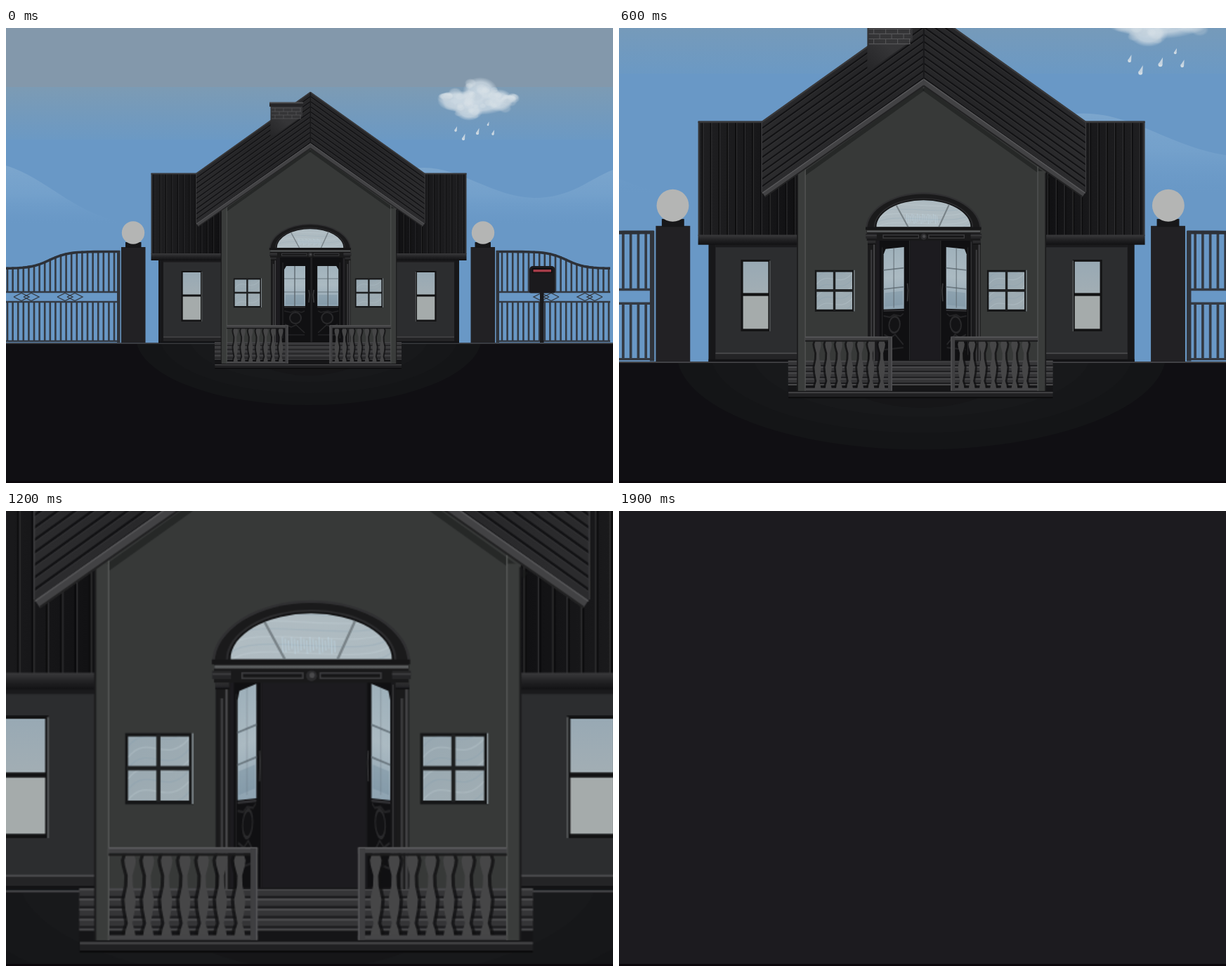
Animation, 864 px wide and 648 px high, one loop 2.1 s. Source, as an HTML page with a canvas:

```html
<!DOCTYPE html>
<html lang="en">
<head>
<meta charset="utf-8">
<title>House</title>
<style>
html, body { margin: 0; width: 100%; height: 100%; overflow: hidden; background: #1c1b1f; }
canvas { display: block; width: 864px; height: 648px; }
</style>
</head>
<body>
<canvas id="stage" width="864" height="648"></canvas>
<script>
const W = 864, H = 648, STEP = 100, LOOP = 2100, LAST = 19;
const FOCUS = { x: 432, y: 384.5 };
const MAX_DENSITY = 1.5;
const INSIDE = '#1c1b1f';
const stage = document.getElementById('stage').getContext('2d');
const scenery = document.createElement('canvas');
scenery.width = W * MAX_DENSITY;
scenery.height = H * MAX_DENSITY;
const ctx = scenery.getContext('2d');

// Apparent distance shrinks evenly, a little slower at the doorstep.
const distance = k => k <= 14 ? 1 - 0.049 * k : 0.314 - 0.0433 * (k - 14);

function box(x1, y1, x2, y2, fill) {
  ctx.fillStyle = fill;
  ctx.fillRect(x1, y1, x2 - x1, y2 - y1);
}
function trace(points) {
  ctx.beginPath();
  points.forEach(([x, y]) => ctx.lineTo(x, y));
}
function poly(points, fill) {
  trace(points);
  ctx.closePath();
  ctx.fillStyle = fill;
  ctx.fill();
}
function line(points, color, width = 1) {
  trace(points);
  ctx.strokeStyle = color;
  ctx.lineWidth = width;
  ctx.stroke();
}
function ellipse(x, y, rx, ry, fill, turn = 0, from = 0, to = 2 * Math.PI) {
  ctx.beginPath();
  ctx.ellipse(x, y, rx, ry, turn, from, to);
  ctx.fillStyle = fill;
  ctx.fill();
}
function ramp(x1, y1, x2, y2, ...colors) {
  const g = ctx.createLinearGradient(x1, y1, x2, y2);
  colors.forEach((c, i) => g.addColorStop(i / (colors.length - 1), c));
  return g;
}
function clipped(path, draw) {
  ctx.save();
  path();
  ctx.clip();
  draw();
  ctx.restore();
}
function mirrored(axis, draw) {
  draw();
  ctx.save();
  ctx.translate(2 * axis, 0);
  ctx.scale(-1, 1);
  draw();
  ctx.restore();
}
function randomizer(seed) {
  return () => (seed = seed * 16807 % 2147483647) / 2147483647;
}

function sky() {
  box(0, 0, W, 84, '#8398ab');
  box(0, 84, W, 160, ramp(0, 84, 0, 160, '#7c9bb4', '#6b99c4'));
  box(0, 159, W, 450, '#6998c6');
  ctx.fillStyle = ramp(0, 196, 0, 278, 'rgba(150,185,215,.42)', 'rgba(140,180,215,.3)', 'rgba(120,165,210,0)');
  ctx.beginPath();
  ctx.moveTo(0, 196);
  ctx.bezierCurveTo(60, 214, 95, 266, 180, 280);
  ctx.lineTo(0, 280);
  ctx.fill();
  ctx.beginPath();
  ctx.moveTo(560, 205);
  ctx.bezierCurveTo(630, 180, 680, 240, 752, 242);
  ctx.bezierCurveTo(805, 242, 830, 215, W, 202);
  ctx.lineTo(W, 280);
  ctx.lineTo(560, 280);
  ctx.fill();
}

function puff(x, y, rx, ry, rgb, alpha) {
  ctx.save();
  ctx.translate(x, y);
  ctx.scale(rx, ry);
  const g = ctx.createRadialGradient(0, 0, 0, 0, 0, 1);
  g.addColorStop(0, `rgba(${rgb},${alpha})`);
  g.addColorStop(.65, `rgba(${rgb},${alpha * .85})`);
  g.addColorStop(1, `rgba(${rgb},0)`);
  ellipse(0, 0, 1, 1, g);
  ctx.restore();
}

function cloud() {
  const random = randomizer(41);
  const lobes = [
    [670, 106, 49, 18], [675, 90, 25, 20], [642, 104, 28, 15],
    [659, 117, 20, 15], [702, 103, 20, 16], [626, 97, 11, 5], [716, 101, 11, 6]
  ];
  for (const [x, y, rx, ry] of lobes) puff(x, y, rx, ry, '203,216,226', .95);
  for (const [x, y, rx, ry] of lobes) {
    for (let i = 0; i < 9; i++) {
      const angle = random() * 2 * Math.PI, reach = .85 * Math.sqrt(random());
      const dy = Math.sin(angle) * reach;
      const r = 3 + random() * 5;
      puff(x + Math.cos(angle) * reach * rx, y + dy * ry, r * 1.3, r, dy > .3 ? '188,203,215' : '216,225,231', .4);
    }
  }
  for (const [x, y, r] of [[640, 146, 1.7], [651, 158, 2.1], [671, 150, 2.1], [686, 138, 1.3], [693, 151, 1.7]]) {
    ellipse(x, y, r, r, '#d3dde4');
    poly([[x - r, y - .5], [x + r * 1.2, y - r * 3.6], [x + r, y]], '#c5d3df');
  }
}

function fence() {
  const iron = '#343a43';
  const topAt = x => 341 - 24 / (1 + Math.exp((62 - x) / 13));
  for (let x = 2; x < 158; x += 7.6) {
    box(x - 1.3, topAt(x), x + 1.3, 376, iron);
    box(x - 1.3, 390, x + 1.3, 446, iron);
  }
  const rail = [];
  for (let x = 0; x <= 162; x += 6) rail.push([x, topAt(x) + 1.5]);
  line(rail, '#2d3138', 3.6);
  for (const y of [376, 390, 446]) line([[0, y], [162, y]], iron, 2.4);
  for (const cx of [29, 91]) {
    for (const dx of [-7, 7]) {
      line([[cx + dx - 11, 383], [cx + dx, 377.5], [cx + dx + 11, 383], [cx + dx, 388.5], [cx + dx - 11, 383]], iron, 1.3);
    }
  }
  box(158, 317, 162.5, 448, '#30343b');
  box(164, 312, 198.5, 448.5, '#222124');
  box(170, 305, 192.5, 313, '#171719');
  ellipse(181, 291.5, 16.2, 16.2, '#b4b5b4');
}

function mailbox() {
  box(760, 376, 765.5, 448, '#1a1a1c');
  ctx.beginPath();
  ctx.roundRect(745, 339, 36.5, 38.5, [5, 5, 2, 2]);
  ctx.fillStyle = '#1b1a1d';
  ctx.fill();
  box(749, 342, 777.5, 349, '#0f0e10');
  box(750.5, 344, 776, 347.5, '#a53c49');
}

function ground() {
  box(0, 448.5, W, H, '#100f13');
  clipped(() => { ctx.beginPath(); ctx.rect(0, 449, W, 199); }, () => {
    ellipse(431, 440, 246, 97, '#141517');
    ellipse(431, 440, 212, 80, '#161719');
    ellipse(431, 440, 170, 64, '#18191b');
    ellipse(431, 440, 100, 55, '#161618');
  });
  box(0, 448.5, W, 449.8, '#454548');
}

function glass(x1, y1, x2, y2, top = '#98a8b1', bottom = '#a0adb3') {
  box(x1, y1, x2, y2, ramp(x1, y1, x2, y2, top, bottom));
  clipped(() => { ctx.beginPath(); ctx.rect(x1, y1, x2 - x1, y2 - y1); }, () => {
    for (let i = 0; i < 7; i++) {
      const y = y1 + i * (y2 - y1) / 6;
      ctx.beginPath();
      ctx.moveTo(x1, y + 6);
      ctx.bezierCurveTo(x1 + 12, y - 9, x2 - 14, y + 11, x2, y - 5);
      ctx.strokeStyle = i % 2 ? 'rgba(210,222,229,.22)' : 'rgba(120,150,172,.2)';
      ctx.lineWidth = .8;
      ctx.stroke();
    }
  });
}

function wing() {
  box(217, 329, 308, 448.5, '#171719');
  box(224, 331, 308, 448, '#2c2d2f');
  box(224, 331, 308, 333.5, '#1a1a1c');
  box(224, 439.5, 308, 440.7, '#4a4a4c');
  box(224, 441, 308, 446, '#242426');
  box(217, 446, 308, 448.5, '#131315');
  box(207, 207, 308, 322, ramp(207, 0, 308, 0, '#1f1f21', '#19191b', '#101012'));
  for (let x = 210.2; x < 306; x += 8.4) {
    box(x, 207, x + 1.1, 322, '#0b0b0c');
    box(x + 1.1, 207, x + 1.9, 322, '#303032');
  }
  box(206.5, 206.5, 308, 208.5, '#38383a');
  box(206.5, 207, 208.2, 322, '#343436');
  box(206.5, 321, 308, 331, ramp(0, 321, 0, 331, '#3a3a3c', '#222224', '#111113'));
  box(249.5, 346, 279, 418, '#131314');
  box(251.7, 348, 277, 379.5, ramp(0, 348, 0, 380, '#98a9b4', '#a2aeb4'));
  box(251.7, 382.5, 277, 415.5, '#a5abab');
  box(278.2, 347, 279.2, 418, '#5a5d5e');
}

function facade() {
  poly([[307, 449], [307, 250], [433, 160], [556, 250], [556, 449]], '#373938');
  for (const side of [-1, 1]) {
    line([[433, 174], [433 + side * 126, 264]], 'rgba(25,26,26,.55)', 4);
  }
  for (const x of [323.9, 496.9]) {
    box(x, 356.4, x + 40, 398.2, '#161718');
    glass(x + 1.7, 358.4, x + 37.5, 396);
    box(x + 18.3, 357, x + 20.7, 397, '#1f2122');
    box(x + .8, 375.7, x + 38.5, 378.3, '#1f2122');
    box(x + 39.1, 356.4, x + 40, 398, '#8f999d');
  }
}

function chimney() {
  poly([[376.5, 157], [376.5, 108], [422, 108], [422, 125]], ramp(376, 157, 420, 108, '#242426', '#353537', '#343436'));
  for (let row = 0; row < 4; row++) {
    const y = 114 + row * 5;
    line([[378, y], [420, y]], '#555557', .8);
    for (let x = 383 + row % 2 * 6; row < 3 && x < 420; x += 12) line([[x, y], [x, y + 5]], '#555557', .8);
  }
  box(375, 106, 423, 112, '#252527');
  box(375, 105.5, 423, 107.5, '#4d4d4f');
}

function gableSide() {
  const slope = .716;
  const plane = [[433.4, 91], [270, 207.5], [271, 279], [433.4, 166]];
  poly(plane, ramp(433, 100, 290, 260, '#28282a', '#252527', '#2b2b2d'));
  clipped(() => { trace(plane); ctx.closePath(); }, () => {
    for (let d = 6; d < 78; d += 7.3) {
      line([[434, 91 + d], [268, 91 + d + 166 * slope]], '#121214', 1.5);
      line([[434, 92.3 + d], [268, 92.3 + d + 166 * slope]], '#343436', .6);
    }
  });
  line([[433.4, 91.5], [270, 208]], '#39393b', 1.6);
  line([[270.5, 207], [270.5, 278]], '#3a3a3c', 1);
  poly([[433.4, 164], [271, 278.5], [274, 283], [433.4, 171.5]], '#424244');
  line([[433.4, 164.5], [271, 279]], '#565658', 1);
  line([[433.4, 171], [274, 282.5]], '#222223', 1.4);
}

function gable() {
  mirrored(433.3, gableSide);
  box(432.6, 92, 434, 164, '#19191b');
}

function steps() {
  box(297, 447.5, 563, 472, '#353537');
  for (let i = 0; i < 5; i++) {
    const y = 447.5 + i * 5.9;
    box(297, y, 563, y + 1.3, '#4a4a4c');
    box(297, y + 4.4, 563, y + 5.9, '#1d1d1f');
  }
  box(297, 472.5, 563, 479, '#151517');
  box(297.3, 479, 563, 485, '#202022');
  box(297.3, 479, 563, 480.3, '#454547');
  box(297.3, 484, 563, 485.2, '#0a0a0b');
}

function baluster(x, fill) {
  const half = [[427, 2.2], [431, 3.4], [434, 3], [440, 1.4], [446, 1.6], [454, 3.3], [460, 2.8], [468, 1.3], [472, 2.6], [476, 3.2]];
  const right = half.map(([y, w]) => [x + w, y]);
  const left = half.map(([y, w]) => [x - w, y]).reverse();
  poly([...right, ...left], fill);
}

function railing() {
  box(306.7, 257, 314.4, 478, '#3a3c3b');
  box(305.7, 259, 306.9, 478, '#1c1c1d');
  box(313.8, 252, 314.6, 478, '#575958');
  for (let i = 0; i < 7; i++) {
    const x = 326.8 + i * 10.72;
    baluster(x - 2, 'rgba(18,18,19,.8)');
    baluster(x, '#464647');
  }
  box(314.2, 423.5, 401.5, 427, '#404042');
  box(314.2, 423.3, 401.5, 424.4, '#59595b');
  box(314.2, 427, 397.5, 428.4, '#1b1b1c');
  box(314.2, 475, 401.5, 477.8, '#454547');
  box(397.4, 424, 401.5, 477.8, '#3f3f41');
  box(400.6, 424, 401.5, 477.8, '#555557');
}

function leaf(k) {
  const turn = 1 - .0527 * k, rise = 8 * k / 14, top = 339 - .5 * k;
  const sill = y => [[-39, y + .1 * rise], [-9, y + .6 * rise]];
  ctx.save();
  ctx.translate(435 - 2.57 * k, 0);
  ctx.transform(turn, -rise / 45, 0, 1, 0, -rise);
  box(-45, 320, 0, 460, '#101012');
  box(-1.4, 320, -.3, 460, '#2c2c2e');
  box(-41.5, 334, -40.5, 442, '#2b2b2d');
  poly([[-36, top], [-9, top], ...sill(396).reverse(), [-39, top + 5]], ramp(0, 335, 0, 396, '#9fb1bb', '#abbac2', '#8fa4b2'));
  box(-37, 380, -11, 394, 'rgba(110,135,153,.35)');
  for (const y of [357, 376]) line([[-39, y], [-9, y]], '#6d7a82', 1.2);
  line([[-24, top], [-24, 396]], `rgba(89,99,106,${turn})`, 1.3);
  line(sill(397.5), '#303033', 1.5);
  line([[-39, 403], [-30, 405], [-24, 403], [-14, 405], [-10, 403]], '#232325', 1.5);
  ellipse(-23, 413, 9, 9, '#29292b');
  ellipse(-23, 413, 7, 7, '#131315');
  line([[-38, 422], [-29, 426], [-22, 423], [-10, 434]], '#252527', 1.5);
  line([[-38, 437], [-10, 437]], '#222224', 1.5);
  line([[-4, 373], [-3, 380], [-4, 391]], '#39393b', 1.7);
  ctx.restore();
}

function column(left) {
  const x = left + .7;
  box(x, 328, x + 7.2, 448, '#1a1a1b');
  box(x + 2.2, 336, x + 3.8, 448, '#39393b');
  box(x + 5, 330, x + 6.5, 448, '#434345');
  box(left, 324.8, left + 8, 330.6, ramp(0, 325, 0, 330.6, '#363638', '#202022'));
  box(left, 329.8, left + 8, 330.7, '#101011');
}

function doorway(k) {
  box(377, 322, 489.5, 448, '#19191b');
  box(385.5, 326, 479.8, 447, INSIDE);
  clipped(() => { ctx.beginPath(); ctx.rect(385.5, 326.5, 94.3, 120.7); }, () => mirrored(434.6, () => leaf(k)));
  box(480.6, 328, 481.4, 448, '#353537');
  column(376.9);
  column(482.5);

  // Fanlight
  ellipse(433, 315.5, 58.2, 37, '#303032', 0, Math.PI, 0);
  ellipse(433, 315.5, 56.6, 35.5, '#1a1a1b', 0, Math.PI, 0);
  ellipse(433, 313.5, 50, 29.5, '#2b2b2d', 0, Math.PI, 0);
  ellipse(433, 313.5, 48.6, 28.3, '#111112', 0, Math.PI, 0);
  clipped(() => { ctx.beginPath(); ctx.ellipse(433, 313.2, 47.3, 27, 0, Math.PI, 0); }, () => {
    glass(385, 286, 481, 313.3, '#b0bcc2', '#adbac0');
    for (let i = 0; i < 18; i++) {
      const x = 416 + i * 1.8;
      line([[x, 300 + i % 3], [x + .4, 310 - i % 4]], 'rgba(195,222,238,.5)', .6);
    }
    line([[417.5, 313], [405, 290]], '#798388', 1.5);
    line([[448.5, 313], [459, 290]], '#798388', 1.5);
  });
  box(374.8, 313.2, 491, 316.1, '#161617');

  // Entablature
  box(376, 316, 490.2, 326.8, '#19191a');
  box(376.2, 316.5, 490, 318.7, ramp(0, 316.5, 0, 318.7, '#4a4b4c', '#5d6061', '#3a3b3c'));
  mirrored(433.2, () => {
    box(375, 319.8, 386, 324.7, '#252527');
    box(375, 321.2, 386, 322.3, '#3c3c3e');
    box(392, 320.7, 428.6, 324.7, '#3b3b3d');
    box(393, 321.7, 427.6, 323.7, '#161617');
  });
  ellipse(433.2, 322.8, 3.2, 3.2, '#2b2b2d');
  ellipse(433.5, 322.5, 1.6, 1.6, '#49494b');
}

function scene(k) {
  sky();
  cloud();
  mirrored(430, fence);
  mailbox();
  ground();
  mirrored(431, wing);
  facade();
  steps();
  doorway(k);
  mirrored(431, railing);
  gable();
  chimney();
}

// The house is painted at a limited density, so close views turn soft.
function render(k) {
  stage.fillStyle = INSIDE;
  stage.fillRect(0, 0, W, H);
  if (k < LAST) {
    const zoom = 1 / distance(k);
    const density = Math.min(zoom, MAX_DENSITY);
    const near = density === zoom;
    const left = near ? FOCUS.x * (1 - 1 / zoom) : 0;
    const top = near ? FOCUS.y * (1 - 1 / zoom) : 0;
    ctx.setTransform(density, 0, 0, density, -left * density, -top * density);
    scene(k);
    const scale = zoom / density;
    stage.imageSmoothingQuality = 'high';
    stage.setTransform(scale, 0, 0, scale, near ? 0 : FOCUS.x * (1 - zoom), near ? 0 : FOCUS.y * (1 - zoom));
    stage.drawImage(scenery, 0, 0);
    stage.setTransform(1, 0, 0, 1, 0, 0);
  }
  stage.fillStyle = '#0b070b';
  stage.fillRect(0, 645, W, H - 645);
}

let shown = -1;
const start = performance.now();
function tick() {
  const k = Math.min(LAST, Math.floor((performance.now() - start) % LOOP / STEP));
  if (k !== shown) render(shown = k);
  requestAnimationFrame(tick);
}
tick();
</script>
</body>
</html>
```
